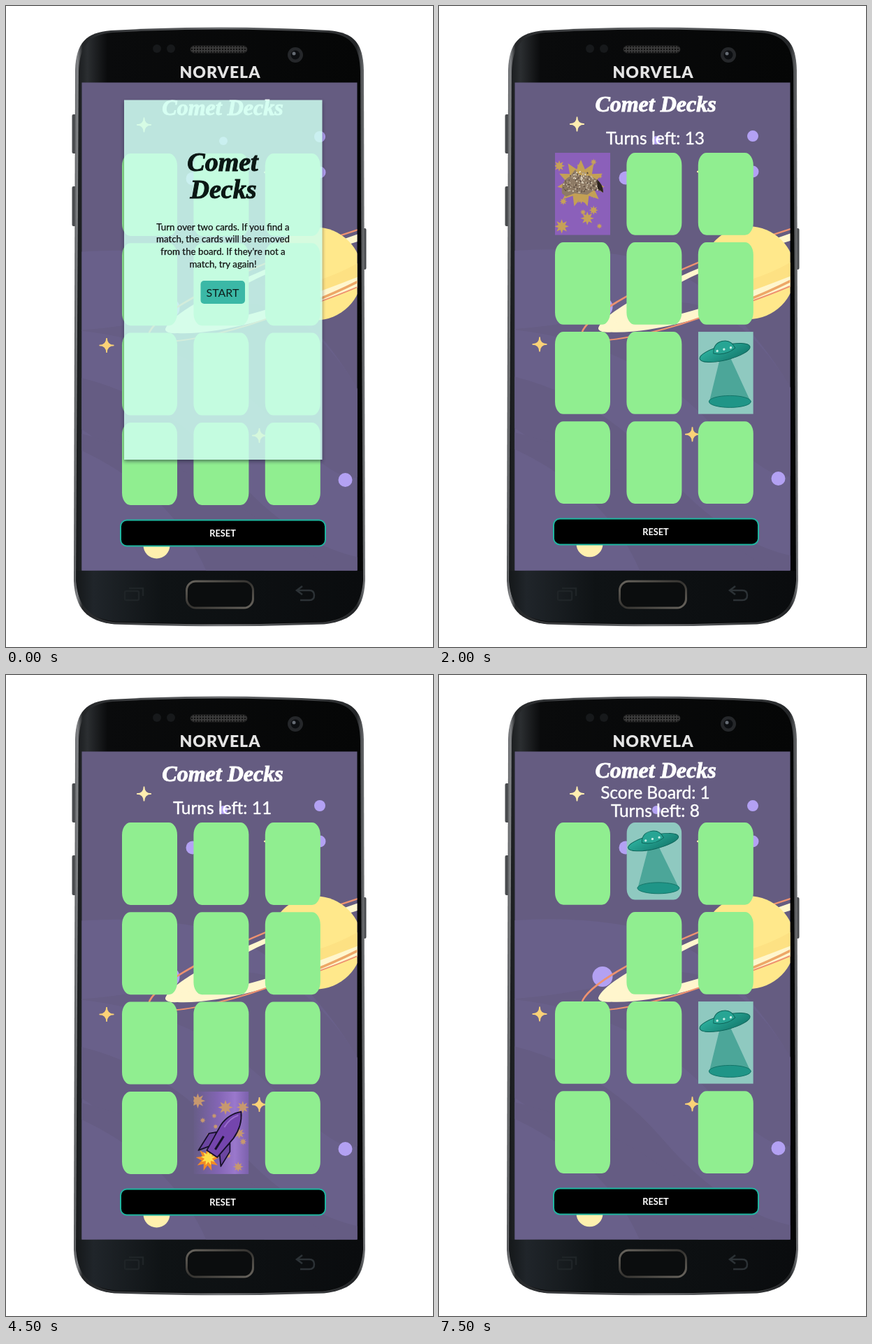
Recreate the animation shown at these times as an HTML page. Size 611 by 917 pixels, loop 8 s.

```html
<!DOCTYPE html>
<html lang="en">
<head>
<meta charset="utf-8">
<title>Card game</title>
<style>
html, body { margin: 0; width: 100%; height: 100%; overflow: hidden; background: #fff; }
svg { display: block; width: 100%; height: 100%; }
text { font-family: Lato, "Open Sans", sans-serif; text-anchor: middle; }
.title { font: italic 700 32px "Liberation Serif", "Noto Serif", serif; fill: #fff; stroke: #fff; }
.big { font-size: 38px; fill: #0b1714; stroke: #0b1714; }
.stat { font-size: 24.5px; fill: #fff; stroke: #fff; stroke-width: .4; }
.help { font-size: 13.3px; fill: #111; stroke: #111; stroke-width: .25; }
</style>
</head>
<body>
<svg viewBox="0 0 611 917" xmlns="http://www.w3.org/2000/svg">
  <defs>
    <linearGradient id="rim" x2="1" y2="0">
      <stop offset="0" stop-color="#4a4c4f"/><stop offset=".012" stop-color="#85878a"/>
      <stop offset=".03" stop-color="#232527"/><stop offset=".5" stop-color="#6d6f72"/>
      <stop offset=".97" stop-color="#232527"/><stop offset="1" stop-color="#77797c"/>
    </linearGradient>
    <linearGradient id="face" x2="1" y2="0">
      <stop offset="0" stop-color="#17191b"/><stop offset=".04" stop-color="#2b2e31"/>
      <stop offset=".11" stop-color="#0a0b0c"/><stop offset="1" stop-color="#050606"/>
    </linearGradient>
    <linearGradient id="chin" x2="1" y2="0">
      <stop offset="0" stop-color="#15181a"/><stop offset=".06" stop-color="#20252a"/>
      <stop offset=".3" stop-color="#0f1315"/><stop offset="1" stop-color="#0a0c0e"/>
    </linearGradient>
    <linearGradient id="metal" x2="1" y2="1">
      <stop offset="0" stop-color="#6a665f"/><stop offset=".5" stop-color="#34322f"/>
      <stop offset="1" stop-color="#6a665f"/>
    </linearGradient>
    <linearGradient id="teal" x2="1" y2="1">
      <stop offset="0" stop-color="#2fb5a2"/><stop offset="1" stop-color="#12776b"/>
    </linearGradient>
    <linearGradient id="violet" x2="1" y2="0">
      <stop offset="0" stop-color="#675d87"/><stop offset=".45" stop-color="#8365b4"/>
      <stop offset=".75" stop-color="#9a78cc"/><stop offset="1" stop-color="#7b61ac"/>
    </linearGradient>
    <linearGradient id="amber" x2="0" y2="1">
      <stop offset="0" stop-color="#e4b04c"/><stop offset=".5" stop-color="#d2994f"/>
      <stop offset="1" stop-color="#e2a03c"/>
    </linearGradient>
    <pattern id="mesh" width="4" height="4" patternUnits="userSpaceOnUse">
      <rect width="4" height="4" fill="#3b3b3b"/><circle cx="2" cy="2" r="1.2" fill="#101010"/>
    </pattern>
    <filter id="blur"><feGaussianBlur stdDeviation="2.5"/></filter>
    <clipPath id="screen"><rect x="108.5" y="109.5" width="394" height="698"/></clipPath>
    <clipPath id="outside"><path clip-rule="evenodd" d="M0 0H611V917H0ZM169 134.500H452.500V649H169Z"/></clipPath>
    <clipPath id="square"><rect width="79" height="118"/></clipPath>
    <clipPath id="round"><rect width="79" height="118" rx="12" ry="17.700"/></clipPath>
  </defs>

  <!-- phone -->
  <g fill="#4a4c4f">
    <rect x="94.500" y="155" width="6" height="56" rx="2"/>
    <rect x="94.500" y="258" width="6" height="57" rx="2"/>
    <rect x="510" y="318" width="5.500" height="59" rx="2"/>
  </g>
  <path d="M99 92C100 52 115 38 150 35Q305 26 462 35C497 38 511 52 512 92L514 822C512 862 496 880 455 884.500Q305 890 155 884.500C115 880 99 862 97 822Z" fill="url(#rim)"/>
  <path d="M104 94C105 58 118 41 152 38Q305 29 460 38C494 41 506 58 507 94L511 822C508 858 493 877 453 881.500Q305 887 157 881.500C118 877 103 858 100 822Z" fill="url(#face)"/>
  <path d="M100.500 808H510.500L510 825C507 858 493 876 453 880.500Q305 886 157 880.500C118 876 103 858 100.500 822Z" fill="url(#chin)"/>
  <g fill="#17191b"><circle cx="216" cy="61" r="6"/><circle cx="236" cy="61" r="6"/></g>
  <rect x="264" y="57" width="81" height="10" rx="5" fill="url(#mesh)" stroke="#262626"/>
  <circle cx="414" cy="70" r="11" fill="#25272a"/>
  <circle cx="414" cy="70" r="6.500" fill="#0c0e11"/>
  <circle cx="412" cy="68" r="2.500" fill="#666c74"/>
  <text x="306.500" y="103" font-size="23" font-weight="900" letter-spacing="1" fill="#e4e4e4">NORVELA</text>
  <rect x="258.500" y="823" width="95" height="38" rx="13" fill="#0b0d0e" stroke="url(#metal)" stroke-width="3"/>
  <g fill="none" stroke="#1f2427" stroke-width="2.500">
    <rect x="170" y="837" width="20" height="13" rx="2"/>
    <path d="M176 833H196V844"/>
    <path d="M424 830L416 836L424 842M416 836H434Q441 836 441 843Q441 850 434 850H421" stroke="#2c3236"/>
  </g>

  <!-- screen -->
  <g clip-path="url(#screen)">
    <rect x="108" y="109" width="395" height="699" fill="#655c81"/>
    <g id="app">
      <g id="space"></g>
      <g id="board"></g>
      <rect x="164" y="735.500" width="293" height="37" rx="9" fill="#000" stroke="#1fb5a0" stroke-width="2"/>
      <text x="310" y="759" font-size="12.800" font-weight="700" fill="#fff">RESET</text>
      <g id="intro">
        <g clip-path="url(#outside)">
          <rect x="169" y="137" width="283.500" height="514.500" fill="#1c2433" opacity=".55" filter="url(#blur)"/>
        </g>
        <rect x="169" y="134.500" width="283.500" height="514.500" fill="#cffff0" opacity=".84"/>
        <text class="title big" x="310" y="236">Comet</text>
        <text class="title big" x="311" y="275">Decks</text>
        <g id="help"></g>
        <rect x="278.500" y="393" width="63.500" height="33" rx="5" fill="#3bb8a6"/>
        <text x="310" y="415.500" font-size="16" fill="#0d1f1c">START</text>
      </g>
    </g>
  </g>
</svg>
<script>
const $ = id => document.getElementById(id);
const STEP = 500, FIRST_TURNS = 14;

const dot = (x, y, r, fill, extra = '') =>
  `<circle cx="${x.toFixed(1)}" cy="${y.toFixed(1)}" r="${r}" fill="${fill}" ${extra}/>`;
const oval = (x, y, rx, ry, fill, extra = '') =>
  `<ellipse cx="${x}" cy="${y}" rx="${rx}" ry="${ry}" fill="${fill}" ${extra}/>`;
const shape = (d, fill, extra = '') => `<path d="${d}" fill="${fill}" ${extra}/>`;
const line = (d, color, width) => shape(d, 'none', `stroke="${color}" stroke-width="${width}"`);
const times = (n, make) => Array.from({ length: n }, (_, i) => make(i)).join('');
const backdrop = fill => `<rect width="79" height="118" fill="${fill}"/>`;

function random(seed) {
  return () => (seed = seed * 16807 % 2147483647) / 2147483647;
}

function burst(x, y, r, fill, points = 8, inner = 0.5) {
  const corner = i => {
    const a = i * Math.PI / points, k = i % 2 ? r * inner : r;
    return `${(x + k * Math.sin(a)).toFixed(1)} ${(y - k * Math.cos(a)).toFixed(1)} `;
  };
  return `<polygon points="${times(points * 2, corner)}" fill="${fill}"/>`;
}

// one star in each cell of a loose 3 by 5 grid
function scatter(seed, fill, biggest) {
  const rnd = random(seed);
  return times(15, i => burst(6 + (i % 3 + rnd()) * 22, 5 + (Math.floor(i / 3) + rnd()) * 21,
    3.5 + (biggest - 3.5) * rnd() ** 2, fill));
}

// dark spots on a ring around a centre
const craters = (x, y, ring, count, r, fill) => times(count, i => {
  const a = 0.5 + i * 2 * Math.PI / count;
  return dot(x + ring * Math.cos(a), y + ring * Math.sin(a), r, fill);
});

const sparkle = (x, y, r, fill) => shape(
  `M${x} ${y - r}Q${x} ${y} ${x + r} ${y}Q${x} ${y} ${x} ${y + r}Q${x} ${y} ${x - r} ${y}Q${x} ${y} ${x} ${y - r}Z`,
  fill, `stroke="${fill}" stroke-width="1.5"`);

function space() {
  const lilac = '#b3a1f3', orange = '#ee9270', cream = '#fff6cd', gold = '#fbd277';
  const moons = [[449, 187, 8], [311, 193, 6], [267, 247, 9.5], [449, 238, 8.5], [234, 432, 14.5], [485.5, 678, 10]];
  return shape('M100 352Q200 344 290 363Q420 400 510 560V830H100Z', '#69608a') +
    shape('M100 464Q270 480 380 590T510 668V560Q420 400 300 430T100 464Z', '#665d84') +
    times(2, i => shape(`M100 ${530 + 80 * i}Q230 ${560 + 80 * i} 320 ${665 + 40 * i}T510 ${790 + 40 * i}V830H${395 - 100 * i}Q250 700 100 ${600 + 32 * i}Z`, '#655c83')) +
    moons.map(([x, y, r]) => dot(x, y, r, lilac)).join('') +
    dot(215.5, 771.5, 19, '#fff0ae') +
    shape('M228 462C240 430 380 368 510 324V335Q400 368 345 397C300 420 270 450 300 450L245 468Q228 469 228 462Z', cream) +
    line('M204 470C215 432 370 362 510 318', orange, 2.5) +
    dot(443, 383, 66.5, '#ffe88b') +
    shape('M380 405Q450 400 510 364V383Q460 420 385 430Z', '#fde183') +
    shape('M228 462Q260 448 300 450Q350 448 510 385V400Q330 472 245 468Q228 468 228 462Z', cream) +
    line('M372 445Q440 427 510 391', '#eda767', 3.5) +
    line('M204 470C214 496 330 463 372 448Q450 425 510 399', orange, 2) +
    sparkle(197.5, 170, 10.5, '#ffeeb0') + sparkle(144, 485.5, 10.5, gold) +
    sparkle(362.5, 614.5, 10.5, gold) + sparkle(372, 238, 3, '#ffeeb0');
}

function saucer() {
  const ink = 'stroke="#0d6459"';
  return backdrop('#8fc9c0') +
    shape('M31 39H47L75 100Q46 112 16 100Z', '#4ca699') +
    oval(45.5, 100, 30, 8.5, '#1f9587', 'stroke="#147468"') +
    '<g transform="rotate(-14 38 29)">' +
    oval(38, 30, 37, 10.5, 'url(#teal)', ink) +
    shape('M22 27Q25 13 38 13T54 27Q38 35 22 27Z', '#27a594', ink) +
    times(3, i => dot(28 + i * 10, 25, 1.7, '#c5f0e5')) + '</g>';
}

function geode() {
  const rnd = random(11), tones = ['#c9bba4', '#6b584a', '#a8967e', '#e6dcc8', '#54453b'];
  const grit = times(160, i => {
    const a = Math.PI * (1.04 + rnd() * 0.92), k = Math.sqrt(rnd());
    return dot(38 + 28 * k * Math.cos(a), 57 + 30 * k * Math.sin(a), 1, tones[i % 5]);
  });
  return backdrop('#8b60ba') + scatter(5, '#c6a158', 11) + burst(37, 44, 34, '#c3a055', 11, 0.62) +
    shape('M10 58Q8 40 21 34L29 24L34 32Q68 32 69 57L58 52L46 60L28 58L16 63Z', '#8d7a65') + grit +
    shape('M60 38Q69 46 69 57L61 51Z', '#2b221d');
}

function comet() {
  const flame = 'M23 79L34 51L36 63L53 39L51 55L77 36L65 55L73 55L57 68L67 70L39 93Z';
  return backdrop('url(#amber)') + scatter(23, '#ffd326', 9) + shape(flame, '#ec8140') +
    `<g transform="translate(8 28) scale(.68)">${shape(flame, '#f9c52f')}</g>` +
    oval(24, 94, 20, 18, '#b66d22', 'stroke="#2f1a0b" stroke-width="2"') +
    craters(24, 94, 11, 5, 3.2, '#5d3411');
}

function world() {
  const ring = (rx, ry) => line(`M${39 - rx} 58A${rx} ${ry} 0 0 0 ${39 + rx} 58`, '#6d6aa5', 1);
  const back = (rx, ry) => line(`M${39 - rx} 58A${rx} ${ry} 0 0 1 ${39 + rx} 58`, '#6d6aa5', 1);
  const tilt = make => `<g transform="rotate(-24 39 58)">${make(38, 13)}${make(34, 10)}</g>`;
  return backdrop('#999bd5') + scatter(37, '#f7d02e', 12) + tilt(back) +
    dot(38, 55, 21.5, 'url(#teal)') + craters(38, 55, 12, 4, 3.5, '#218b82') + tilt(ring);
}

function rocket() {
  const ink = 'stroke="#17102a" stroke-width="1.800" stroke-linejoin="round"', hull = '#7445ad';
  return backdrop('url(#violet)') + scatter(41, '#c7986f', 11) +
    burst(20, 97, 17, '#f28a27', 9) + burst(21, 95, 11, '#ffe04a', 9) +
    shape('M33 58L22 60L7 84L26 77Z', '#6b45a0', ink) +
    shape('M52 74V86L39 107L37 87Z', '#6b45a0', ink) +
    shape('M68 29Q50 32 39 48L19 84L34 94L57 67Q70 49 68 29Z', hull, ink) +
    line('M43 64L31 83', '#17102a', 3) + line('M64 34Q52 38 44 51', '#9a6fcd', 2);
}

const faces = { g: geode(), u: saucer(), c: comet(), p: world(), r: rocket() };
const deck = 'guxrpccguxrp';
// the card turned in each step, in hexadecimal; a dot is a pause
const moves = '...086b34a3.1781';

function play(n) {
  const gone = new Set();
  let open = [], turns = FIRST_TURNS, score = 0;
  for (const move of moves.slice(0, n + 1)) {
    if (move === '.' || open.length === 2) {
      if (open.length && deck[open[0]] === deck[open[1]]) {
        open.forEach(i => gone.add(i));
        score++;
      }
      open = [];
    }
    if (move !== '.') open.push(parseInt(move, 16));
    if (open.length === 2) turns--;
  }
  return { open, gone, turns, score };
}

function card(i, { open, gone }, flipping) {
  if (gone.has(i)) return '';
  const at = `translate(${166 + i % 3 * 102.4} ${211 + Math.floor(i / 3) * 128.3})`;
  if (!open.includes(i)) return `<rect transform="${at}" width="79" height="118" rx="12" ry="17.7" fill="#90ee90"/>`;
  const turning = flipping && i === open[1];
  return `<g transform="${at} scale(1 ${turning ? 0.94 : 1})" clip-path="url(#${turning ? 'round' : 'square'})">${faces[deck[i]]}</g>`;
}

function draw(n) {
  const game = play(n), { open, turns, score } = game;
  const stats = [];
  if (score) stats.push('Score Board: ' + score);
  if (open.length || turns < FIRST_TURNS) stats.push('Turns left: ' + turns);

  const lines = stats.length, gap = 26.5;
  const lastY = 193.5 + lines * 5;
  $('board').innerHTML =
    `<text class="title" x="310" y="${156 - lines * 4.5}">Comet Decks</text>` +
    stats.map((s, i) => `<text class="stat" x="309.5" y="${lastY - (lines - 1 - i) * gap}">${s}</text>`).join('') +
    times(12, i => card(i, game, n === moves.length - 1));
  $('intro').style.display = n ? 'none' : '';

  // the page sways by a pixel while cards are in play
  const sway = lines ? Math.cos((n - 6) * Math.PI / 2) : 0;
  const squeeze = open.length === 2 ? 0.998 : 1;
  $('app').setAttribute('transform', `translate(0 ${211 + sway}) scale(1 ${squeeze}) translate(0 -211)`);
}

$('space').innerHTML = space();
$('help').innerHTML = ['Turn over two cards. If you find a', 'match, the cards will be removed',
  "from the board. If they're not a", 'match, try again!']
  .map((s, i) => `<text class="help" x="310.5" y="${320.5 + i * 17.8}">${s}</text>`).join('');

const start = performance.now();
let shown = -1;
function tick() {
  const n = Math.floor((performance.now() - start) / STEP) % moves.length;
  if (n !== shown) draw(shown = n);
  requestAnimationFrame(tick);
}
tick();
</script>
</body>
</html>
```
